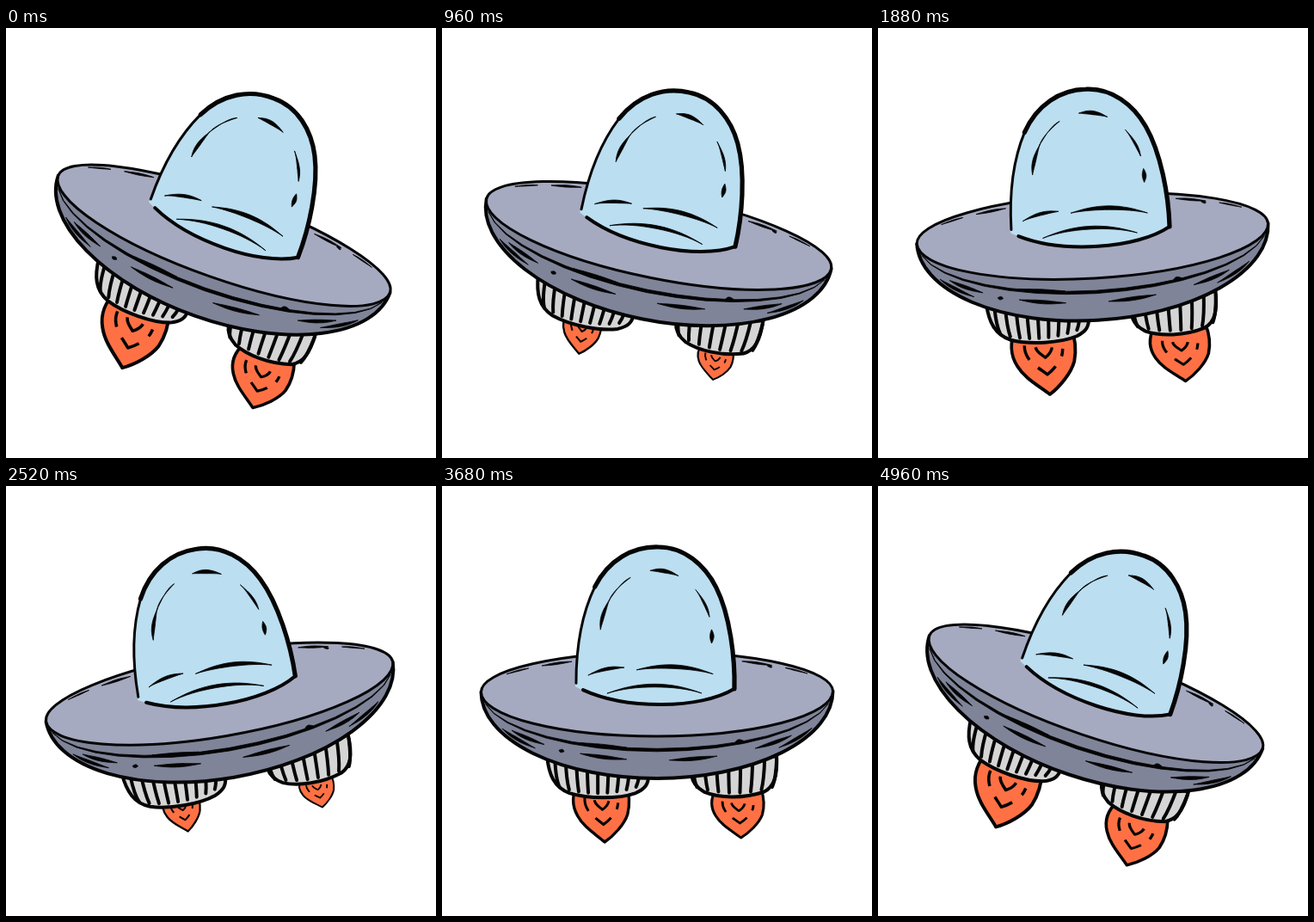
Write an HTML page that moves like this. It is 500 px wide and 500 px high and loops after 5 s.

```html
<!DOCTYPE html>
<html lang="en">
<head>
<meta charset="utf-8">
<title>Flying saucer</title>
<style>
  html, body { margin: 0; width: 100%; height: 100%; overflow: hidden; background: #fff; }
  svg { display: block; width: 100vw; height: 100vh; }
  .line { stroke: #050505; stroke-width: 4; stroke-linejoin: round; stroke-linecap: round; }
  .thin { stroke-width: 3; }
  .bold { stroke-width: 5.2; }
  .open { fill: none; }
  .metal { fill: #d5d5d5; }
  .ink { fill: #050505; stroke: #050505; stroke-width: .8; stroke-linejoin: round; }
</style>
</head>
<body>
<svg viewBox="0 0 500 500">
  <defs><g id="flame"></g></defs>
  <g id="ship">
    <g id="flameL"><use href="#flame"/></g>
    <g id="flameR"><use href="#flame" transform="scale(.93 .83)"/></g>

    <path class="line metal" d="M122 314C124 335 130 350 148 357C170 364 205 364 225 357C236 352 240 347 240 336Z"/>
    <path class="line metal" d="M389 314C390 338 386 350 374 356C350 364 322 363 305 356C296 351 291 345 290 336Z"/>
    <path id="ribs" class="line open"/>

    <path class="line" fill="#7f8499" d="M45.500 239A204.500 101 0 0 0 454.500 239Z"/>
    <path class="line thin" fill="#a6aac0" d="M45.500 239A204.500 46 0 0 1 454.500 239A204.500 52 0 0 1 45.500 239Z"/>
    <path id="hullInk" class="ink"/>

    <path fill="#bbdef1" d="M155 233C155 190 162 150 178 117C194 86 222 70 252 71C282 71 306 92 319 118C335 150 341 200 340 236C300 260 205 260 155 233Z"/>
    <path class="line thin open" d="M156 229C156 190 162 150 178 117"/>
    <path class="line bold open" d="M178 117C194 86 222 70 252 71C282 71 306 92 319 118C335 150 341 200 340 236"/>
    <path class="line open" d="M164 237C214 260 300 260 340 236"/>
    <path id="domeInk" class="ink"/>
  </g>
</svg>
<script>
const el = id => document.getElementById(id);
const setPath = (id, parts) => el(id).setAttribute('d', parts.join(''));

// Pen mark along an ellipse: angle in degrees from the vertical, thickest in the middle
function mark(cx, cy, rx, ry, mid, half, width) {
  const steps = 16, outer = [], inner = [];
  for (let i = 0; i <= steps; i++) {
    const a = (mid - half + 2 * half * i / steps) * Math.PI / 180;
    const w = width / 2 * Math.sin(Math.PI * i / steps);
    const point = d => [cx + (rx + d) * Math.sin(a), cy + (ry + d) * Math.cos(a)].map(v => v.toFixed(1)).join(' ');
    outer.push(point(w));
    inner.unshift(point(-w));
  }
  return `M${[...outer, ...inner].join('L')}Z`;
}

// Hull lines are ellipses that share the rim's width
const hull = (depth, mid, half, width) => mark(250, 239, 204, depth, mid, half, width);
const hullMarks = [
  hull(68, 0, 78, 3.5),
  hull(66, -18, 8, 3),
  hull(66, 28, 1.5, 5),
  hull(82, -33, 1, 4),
  hull(-38, 40, 1, 4)
];
for (let mid = -48; mid <= 42; mid += 30) hullMarks.push(hull(80, mid, 8, 4));
for (const side of [-1, 1]) {
  hullMarks.push(hull(91, side * 53, 9, 3.5));
  for (const mid of [35, 53]) hullMarks.push(hull(-40, side * mid, 6, 3));
}
setPath('hullInk', hullMarks);

const glint = (mid, half) => mark(249, 175, 65, -77, mid, half, 4.5);
setPath('domeInk', [
  glint(-70, 14), glint(-42, 15), glint(9, 15), glint(59, 14), glint(90, 6),
  mark(210, 246, 60, -35, -20, 22, 4),
  mark(262, 280, 110, -70, 5, 24, 4.5),
  mark(247, 300, 110, -68, 0, 30, 3.5)
]);

function ribs(cx, count) {
  let d = '';
  for (let i = 0; i < count; i++) {
    const u = (2 * i + 1) / count - 1;
    d += `M${cx + u * 56} 318Q${cx + u * 55} 341 ${cx + u * 50} ${357 - 9 * u * u}`;
  }
  return d;
}
setPath('ribs', [ribs(181, 9), ribs(340, 8)]);

// Inner flame marks are smaller, broken copies of its outline
const flamePath = 'M-29-6C-36 8-37 24-29 38C-21 53-6 62 8 74C20 66 35 50 39.500 36C43 22 42 8 38-6Z';
const tongue = (size, dashes) =>
  `<path class="line open" d="${flamePath}" pathLength="100" stroke-dasharray="${dashes}"
    transform="translate(4 14) scale(${size}) translate(-4 -14)" style="stroke-width:${3.6 / size};stroke-linecap:butt"/>`;
el('flame').innerHTML =
  `<path class="line" fill="#ff7144" d="${flamePath}"/>` +
  tongue(.6, '0 8 12 9 18 9 6 38') + tongue(.26, '0 12 48 40');

const LOOP = 5000;
const tilt = [[0, 19.4], [2780, -10.4], [LOOP, 18.7]];
const burn = [[0, 1], [840, .565], [1750, 1], [2520, .565], [3340, 1], [4190, .565], [LOOP, 1]];

// Sine-eased value between [time, value] keys
function at(keys, t) {
  const i = keys.findIndex(k => k[0] > t);
  const [t0, a] = keys[i - 1], [t1, b] = keys[i];
  return a + (b - a) * (1 - Math.cos(Math.PI * (t - t0) / (t1 - t0))) / 2;
}

function draw(t) {
  const size = at(burn, t);
  el('ship').setAttribute('transform', `rotate(${at(tilt, t)} 250 250)`);
  el('flameL').setAttribute('transform', `translate(182 351) scale(${size})`);
  el('flameR').setAttribute('transform', `translate(341 357) scale(${size})`);
}

let start;
function tick(now) {
  start ??= now;
  draw(Math.max(0, now - start) % LOOP);
  requestAnimationFrame(tick);
}
draw(0);
requestAnimationFrame(tick);
</script>
</body>
</html>
```
